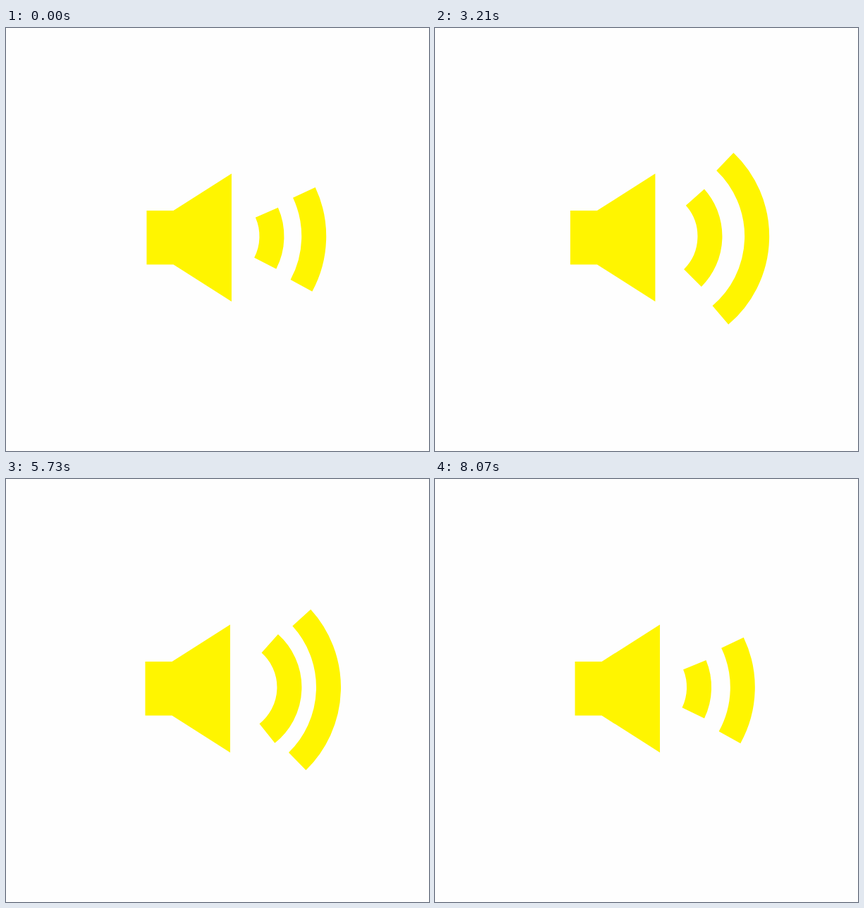
An HTML page for the animation above (8.1 s loop, 600 px wide and 600 px high).

```html
<!DOCTYPE html>
<html lang="en">
<head>
<meta charset="utf-8">
<title>Speaker</title>
<style>
  html, body { margin: 0; width: 100%; height: 100%; overflow: hidden; background: #fefefe; }
  svg { display: block; width: 100%; height: 100%; }
</style>
</head>
<body>
<svg viewBox="0 0 600 600">
  <path id="speaker" fill="#fff500" d="M0 259H38L120.5 206.5V388L38 335.5H0Z"/>
  <g fill="none" stroke="#fff500" stroke-width="35">
    <path id="inner"/>
    <path id="outer"/>
  </g>
</svg>
<script>
const STEP = 30;
const CYCLE = 30; // steps per pulse
const CENTER_Y = 295.5;
const TILT = 1.7;
const HALF_STROKE = 17.5;

const speaker = document.getElementById('speaker');

// Each oscillation is [middle, amplitude, step of its lowest point].
const speakerX = [196.4, 5.2, 19.5];
const waves = [
  { path: document.getElementById('inner'), radius: 83.5, right: [403.9, 15.6, 25.6], sweep: [73, 27.2, 27] },
  { path: document.getElementById('outer'), radius: 146.5, right: [465.3, 11.5, 28.7], sweep: [75.3, 21.8, 0.5] }
];

function swing([middle, amplitude, low], step) {
  return middle - amplitude * Math.cos((step - low) / CYCLE * 2 * Math.PI);
}

function arc(cx, radius, from, to) {
  const point = degrees => {
    const a = degrees * Math.PI / 180;
    return `${(cx + radius * Math.cos(a)).toFixed(2)} ${(CENTER_Y + radius * Math.sin(a)).toFixed(2)}`;
  };
  return `M${point(from)}A${radius} ${radius} 0 0 1 ${point(to)}`;
}

function draw(time) {
  const step = Math.floor(time / STEP) % CYCLE;
  speaker.setAttribute('transform', `translate(${swing(speakerX, step).toFixed(2)} 0)`);
  for (const { path, radius, right, sweep } of waves) {
    const cx = swing(right, step) - radius - HALF_STROKE;
    const half = swing(sweep, step) / 2;
    path.setAttribute('d', arc(cx, radius, TILT - half, TILT + half));
  }
}

const start = performance.now();
function tick() {
  draw(performance.now() - start);
  requestAnimationFrame(tick);
}
tick();
</script>
</body>
</html>
```
